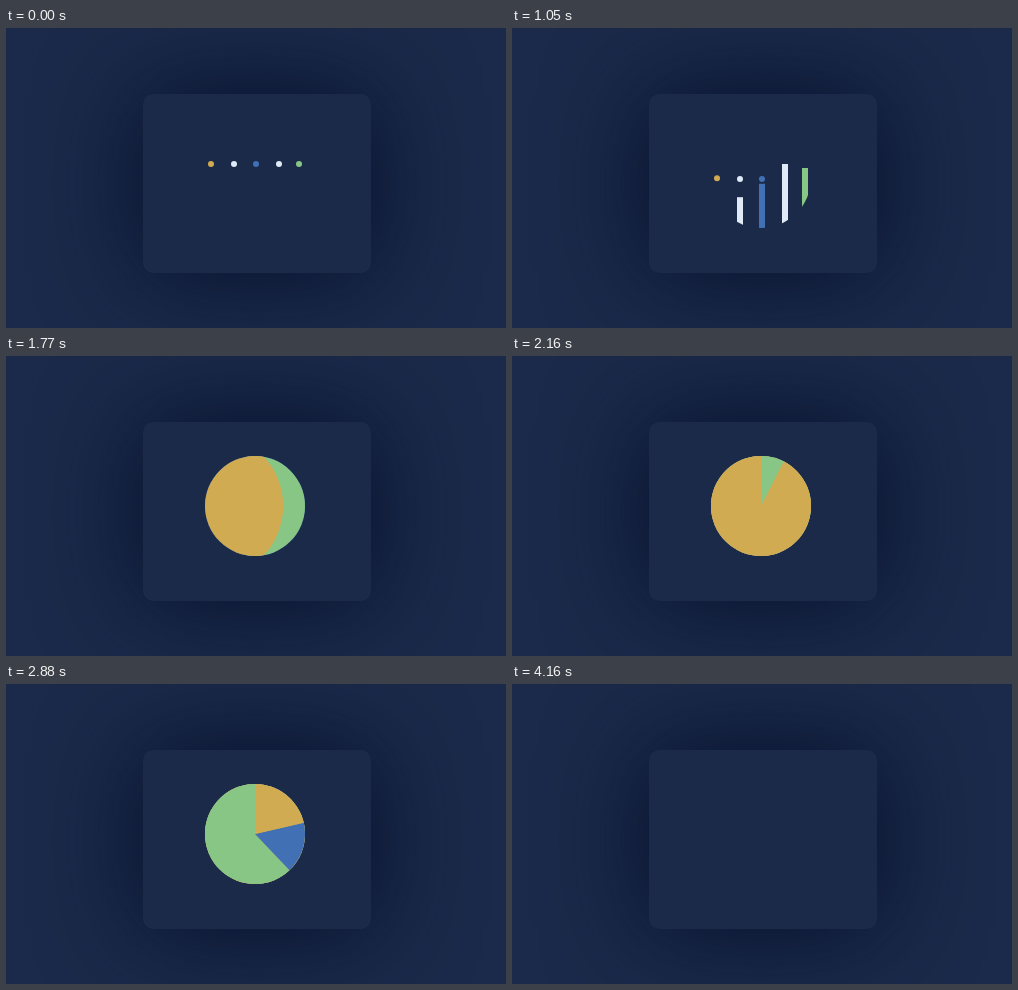
An HTML page for the animation above (4.23 s loop, 500 px wide and 300 px high).

```html
<!DOCTYPE html>
<html lang="en">
<head>
<meta charset="utf-8">
<title>Chart loader</title>
<style>
  html, body { margin: 0; width: 100%; height: 100%; overflow: hidden; background: #1b2a4a; }
  .card {
    position: absolute; left: 137px; top: 66px; width: 228px; height: 179px;
    border-radius: 10px; background: #1b2a48; box-shadow: 0 0 100px rgb(3, 16, 42);
  }
  svg { position: absolute; left: 0; top: 0; display: block; }
</style>
</head>
<body>
<div class="card"></div>
<svg width="500" height="300" viewBox="0 0 500 300">
  <defs><clipPath id="disc"><circle cx="249" cy="150" r="50"/></clipPath></defs>
  <g id="bars" clip-path="url(#disc)"></g>
  <g id="dots"></g>
  <g id="pie"></g>
</svg>
<script>
const LOOP = 4230;
const YELLOW = '#d0ab52', WHITE = '#dfeaf6', BLUE = '#4170b5', GREEN = '#88c686';
const CENTER = { x: 249, y: 150, r: 50 };
const FLOOR = 200, DOT_R = 3, REST_Y = 136, MID_Y = 150;

// top: bar height, level: dot height over the bars, fall: start of the bar's collapse,
// path: [time, x, y] of the closing scatter
const items = [
  { x: 228, color: WHITE, top: 138, level: 154, fall: 800,
    path: [[3250, 228, 150], [3400, 228, 162], [3560, 228, 169]] },
  { x: 273, color: WHITE, top: 136, level: 118, fall: 1185,
    path: [[3250, 273, 150], [3400, 273, 162], [3560, 273, 169]] },
  { x: 250, color: BLUE, top: 151, level: 154, fall: 950,
    path: [[3250, 250, 150], [3400, 288, 136], [3790, 307, 114], [4080, 313, 109]] },
  { x: 293, color: GREEN, top: 140, level: 148, fall: 1300,
    path: [[3250, 293, 150], [3400, 258.5, 133], [3790, 252, 130]] },
  { x: 205, color: YELLOW, top: 145, level: 151, fall: 560,
    path: [[3250, 205, 150], [3400, 210, 136], [3790, 213, 134]] }
];

// Each sweep paints over the previous one, clockwise from the top.
const sweeps = [
  { color: YELLOW, start: 1200, length: 600 },
  { color: GREEN, start: 2055, length: 600 },
  { color: BLUE, start: 2670, length: 500 },
  { color: YELLOW, start: 2728, length: 500 },
  { color: 'none', start: 2890, length: 360 }
];

const clamp = u => Math.min(1, Math.max(0, u));
const progress = (t, start, end) => clamp((t - start) / (end - start));
const ease = u => (1 - Math.cos(Math.PI * u)) / 2;
const easeOut = u => 1 - (1 - u) ** 3;
const mix = (a, b, u) => a + (b - a) * u;

function make(name, parent, attrs) {
  const node = document.createElementNS('http://www.w3.org/2000/svg', name);
  set(node, attrs);
  return document.getElementById(parent).appendChild(node);
}

function set(node, attrs) {
  for (const key in attrs) node.setAttribute(key, attrs[key]);
}

for (const item of items) {
  item.bar = make('rect', 'bars', { x: item.x - 3, width: 6, fill: item.color });
  item.dot = make('circle', 'dots', { fill: item.color });
}
for (const sweep of sweeps) sweep.node = make('path', 'pie', { fill: sweep.color });

function along(path, t) {
  let i = 1;
  while (i < path.length - 1 && t > path[i][0]) i++;
  const [t0, x0, y0] = path[i - 1], [t1, x1, y1] = path[i];
  const u = progress(t, t0, t1);
  return { x: mix(x0, x1, u), y: mix(y0, y1, u) };
}

function sector(from, to) {
  if (to - from < 0.01) return '';
  const { x, y, r } = CENTER;
  const point = deg => {
    const a = deg * Math.PI / 180;
    return `${x + r * Math.sin(a)} ${y - r * Math.cos(a)}`;
  };
  const end = Math.min(to, from + 359.99);
  return `M${x} ${y}L${point(from)}A${r} ${r} 0 ${end - from > 180 ? 1 : 0} 1 ${point(end)}Z`;
}

function drawBar(item, t) {
  const rise = easeOut(progress(t, 30, 480));
  const fall = ease(progress(t, item.fall, item.fall + 500));
  const y = mix(mix(FLOOR, item.top, rise), FLOOR, fall);
  set(item.bar, { y, height: FLOOR - y });
}

function drawDot(item, t) {
  let x = item.x, y, r = DOT_R;
  if (t < 2890) {
    y = mix(REST_Y, item.level, ease(progress(t, 300, 760)));
    y = mix(y, MID_Y, ease(progress(t, 780, 1180)));
    if (item.color !== WHITE) {
      r = Math.min(96, DOT_R + 2.2e-4 * Math.max(0, t - 1210) ** 2);
    }
  } else {
    ({ x, y } = along(item.path, t));
    r = DOT_R * (1 - ease(progress(t, 3850, 4160)));
  }
  set(item.dot, { cx: x, cy: y, r });
}

function drawPie(t) {
  const visible = t >= 1860 && t < 3250;
  const heads = sweeps.map(s => 360 * ease(progress(t, s.start, s.start + s.length)));
  sweeps.forEach((sweep, i) => {
    const from = heads[i + 1] || 0;
    set(sweep.node, { d: visible ? sector(from, heads[i]) : '' });
  });
}

function render(t) {
  for (const item of items) {
    drawBar(item, t);
    drawDot(item, t);
  }
  set(document.getElementById('dots'), { 'clip-path': t < 2890 ? 'url(#disc)' : 'none' });
  drawPie(t);
}

const begin = performance.now();
function tick() {
  render((performance.now() - begin) % LOOP);
  requestAnimationFrame(tick);
}
tick();
</script>
</body>
</html>
```
